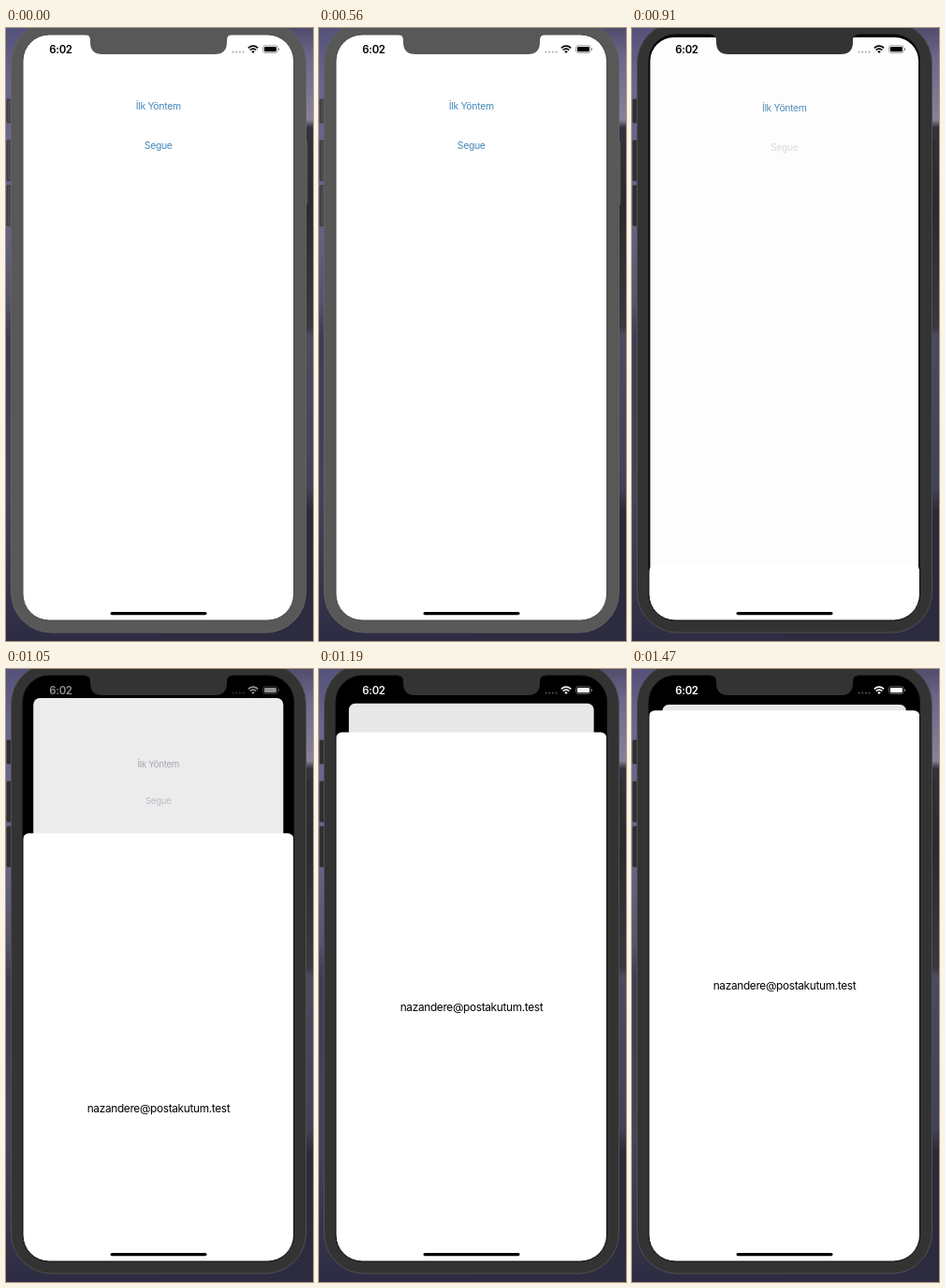
An HTML page for the animation above (2310 ms loop, 328 by 654 pixels).

```html
<!DOCTYPE html>
<html lang="tr">
<head>
<meta charset="utf-8">
<style>
  html, body { margin: 0; width: 100%; height: 100%; overflow: hidden; }
  body {
    background:
      linear-gradient(#4f4c6c, #6b678c 30px, #8a8199 98px, #34333b 106px, #2a2a2f 190px,
        #38383f 318px, #4a4b5e 328px, #414256 490px, #2b2b38 515px, #2c2b40) right / 50% 100% no-repeat,
      linear-gradient(#55527a, #68678f 60px, #66658a 200px, #54556f 290px, #3c3d54 330px,
        #434459 500px, #2d2c43);
  }
  svg { display: block; }
  text { font-family: Inter, "Liberation Sans", sans-serif; letter-spacing: -.3px; text-anchor: middle; }
  .button { font-size: 10.4px; }
  #phone { --bezel: #585858; --edge: #636363; --key: #4b4b4d; --rim: #4d4d4d; }
  #phone.active { --bezel: #333; --edge: #505050; --key: #303032; --rim: #0c0c0c; }
  .keys { fill: var(--key); stroke: #29292d; stroke-width: .7; }
  .body { fill: var(--bezel); stroke: var(--edge); }
  .rim { fill: none; stroke: var(--rim); }
  .notch { fill: var(--bezel); }
</style>
</head>
<body>
<svg id="phone" width="328" height="654" viewBox="0 0 328 654">
  <clipPath id="glass"><rect x="18" y="7" width="289.5" height="625" rx="28"/></clipPath>
  <g class="keys">
    <rect x="1" y="76" width="7" height="25" rx="1"/>
    <rect x="1" y="120" width="7" height="43" rx="1"/>
    <rect x="1" y="168" width="7" height="43" rx="1"/>
    <rect x="318" y="120" width="5" height="69" rx="1"/>
  </g>
  <rect class="body" x="5.5" y="-6" width="315" height="651" rx="43"/>
  <g clip-path="url(#glass)">
    <path d="M18 7h290v625H18z"/>
    <g id="back">
      <rect id="page" x="18" y="7" width="289.5" height="640" fill="#fff"/>
      <text id="first" class="button" x="162.7" y="87">İlk Yöntem</text>
      <text id="segue" class="button" x="162.7" y="129">Segue</text>
      <rect id="shade" x="18" y="7" width="289.5" height="640"/>
    </g>
    <g id="sheet">
      <rect x="18" width="289.5" height="640" rx="6.5" fill="#fff"/>
      <text x="163" y="298" font-size="11.8">nazandere@postakutum.test</text>
    </g>
  </g>
  <rect class="rim" x="18" y="7" width="289.5" height="625" rx="28"/>
  <path class="notch" d="M84 5.5V7q6 0 6 6v2q0 13 13 13h120q13 0 13-13v-2q0-6 6-6V5.5z"/>
  <g id="status">
    <text x="58.5" y="27" font-size="11.4" font-weight="600">6:02</text>
    <path d="M242.5 25.6h12" stroke="currentColor" stroke-width="2.2" stroke-linecap="round"
      stroke-dasharray="0 3.7" opacity=".3"/>
    <g fill="none" stroke="currentColor" stroke-width="1.6">
      <path d="M258.8 21.4q5.2-4.4 10.4 0M260.6 23.5q3.4-2.8 6.8 0"/>
      <rect x="274.6" y="18.7" width="15.6" height="7.8" rx="2.3" stroke-width=".8" opacity=".45"/>
    </g>
    <path d="M262.2 25l1.8 2 1.8-2q-1.8-1.3-3.6 0zM291.3 21.2q1.6 1.4 0 2.8z"/>
    <rect x="275.9" y="20" width="13" height="5.2" rx="1.2"/>
  </g>
  <rect x="111.5" y="623" width="103" height="3.2" rx="1.6"/>
</svg>
<script>
const LOOP = 2310, STEP = 70, PRESS = 700, SETTLED = 1470;
const $ = id => document.getElementById(id);
const clamp = v => Math.min(1, Math.max(0, v));
const mix = (a, b, k) => a + (b - a) * k;
const blend = (a, b, k) => `rgb(${a.map((v, i) => Math.round(mix(v, b[i], k)))})`;

// Critically damped spring, slowing slightly over time.
function spring(ms) {
  const x = ms - 910;
  const phase = Math.max(0, .53 + .01711 * x - 4.34e-6 * x * x);
  return 1 - (1 + phase) * Math.exp(-phase);
}

function draw(ms) {
  const t = Math.min(SETTLED, Math.floor(ms / STEP) * STEP);
  const pressed = t >= PRESS;
  const p = spring(t);
  const scale = 1 - .1 * p;

  $('phone').classList.toggle('active', pressed);
  $('back').setAttribute('transform',
    `translate(${162.75 * (1 - scale)} ${7 + 31 * p - 7 * scale}) scale(${scale})`);
  const radius = mix(28, 7.5, clamp(p / .75));
  for (const id of ['page', 'shade']) $(id).setAttribute('rx', radius);
  $('shade').setAttribute('opacity', .095 * p);
  $('first').setAttribute('fill', blend([69, 135, 184], [208, 190, 193], p));
  $('segue').setAttribute('fill', pressed
    ? blend([230, 230, 230], [195, 198, 212], Math.sqrt(p))
    : 'rgb(69,135,184)');
  $('sheet').setAttribute('transform', `translate(0 ${mix(632, 43.3, p)})`);

  const ink = blend([0, 0, 0], [255, 255, 255], clamp((p - .5) / .48));
  $('status').style.color = $('status').style.fill = ink;
}

function tick(now) {
  draw(now % LOOP);
  requestAnimationFrame(tick);
}
draw(0);
requestAnimationFrame(tick);
</script>
</body>
</html>
```
